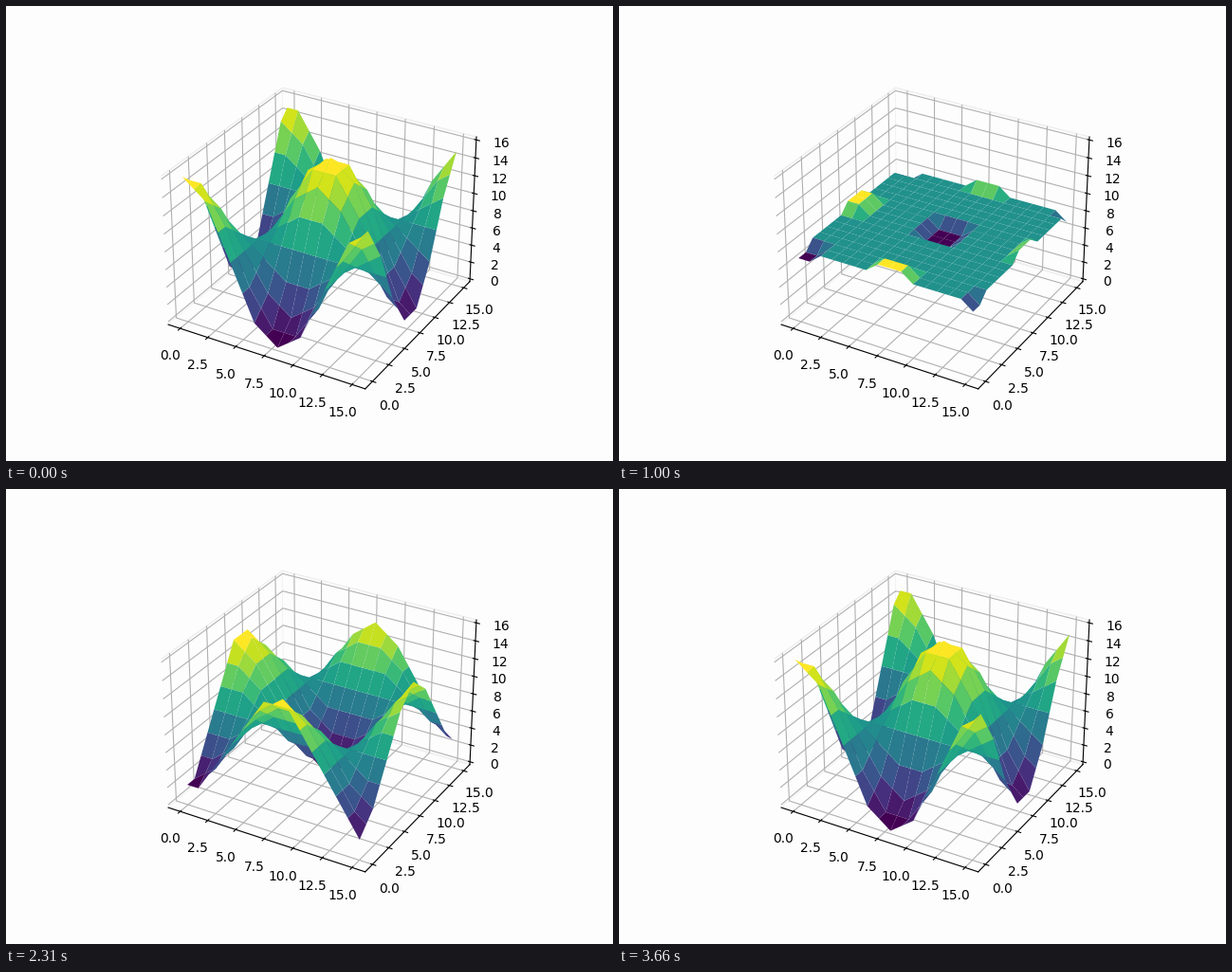
Write a matplotlib script that moves like this. It is 640 px wide and 480 px high and loops after 3.79 s.

```python
import matplotlib.pyplot as plt
import numpy as np
from matplotlib.animation import FuncAnimation

LOOP_MS, TICK_MS = 3790, 10
SIZE, MID = 16, 8
PAPER, PANE_EDGE = "#fdfdfd", "#eeeeee"


def padded(lo, hi):
    pad = (hi - lo) / 48
    return lo - pad, hi + pad


def membrane(step):
    """Standing wave on an integer-valued lattice."""
    wave = np.cos(2 * np.pi * np.arange(SIZE) / SIZE)
    return np.rint(MID + MID * np.outer(wave, wave) * np.cos(0.05 * step))


def step_at(ms):
    if ms < 2070:
        return min(max((ms - 10) // 30, 0), 67)
    return ms // 30 - 1


fig = plt.figure(figsize=(6.4, 4.8), dpi=100, facecolor=PAPER)
ax = fig.add_subplot(projection="3d", facecolor=PAPER)
ax.set_xlim(*padded(-0.75, 15.75))
ax.set_ylim(*padded(-0.75, 15.75))
ax.set_zlim(*padded(0, 16))
ax.set_xticks(np.arange(0, 15.1, 2.5))
ax.set_yticks(np.arange(0, 15.1, 2.5))
ax.set_zticks(np.arange(0, 17, 2))
for axis in (ax.xaxis, ax.yaxis, ax.zaxis):
    axis.set_pane_color(PAPER)
    axis.pane.set_edgecolor(PANE_EDGE)

# The box, grid and labels never move: render them once as a backdrop.
fig.canvas.draw()
backdrop = np.array(fig.canvas.buffer_rgba())
fig.figimage(backdrop, zorder=-1)
ax.set_axis_off()
ax.patch.set_visible(False)

X, Y = np.meshgrid(np.arange(SIZE), np.arange(SIZE))
surfaces = []
for step in range(LOOP_MS // 30):
    surface = ax.plot_surface(X, Y, membrane(step), cmap="viridis")
    surface.set_visible(False)
    surfaces.append(surface)


def update(frame):
    current = step_at(frame * TICK_MS)
    for step, surface in enumerate(surfaces):
        surface.set_visible(step == current)
    return surfaces


anim = FuncAnimation(fig, update, frames=LOOP_MS // TICK_MS,
                     interval=TICK_MS, repeat=True, repeat_delay=0)
plt.show()
```
